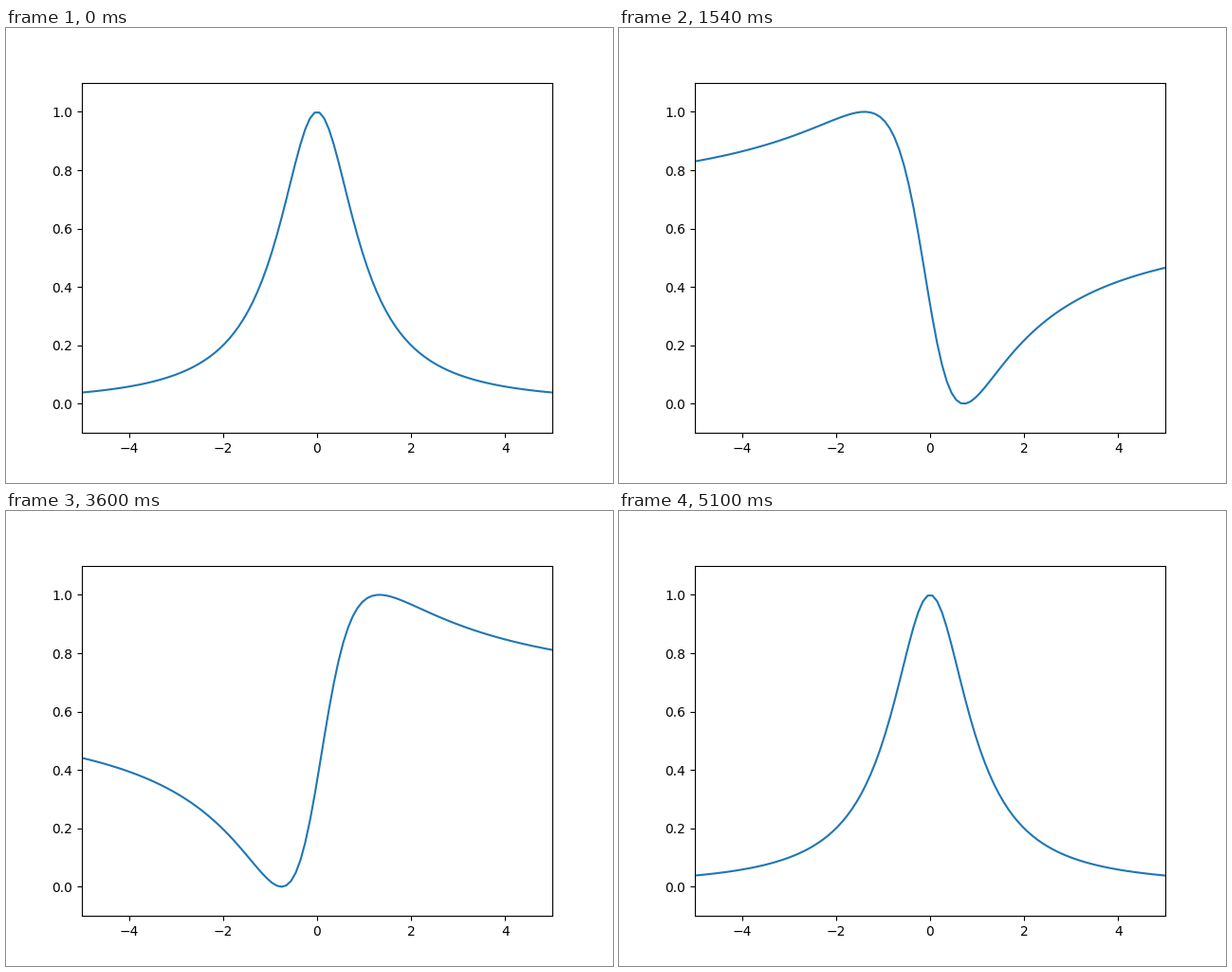
Recreate the animation shown at these times as a matplotlib script. Size 640 by 480 pixels, loop 5.12 s.

```python
import numpy as np
import matplotlib.pyplot as plt
from matplotlib.animation import FuncAnimation

FRAMES = 256
INTERVAL = 20  # ms

x = np.linspace(-5, 5, 100)
phases = np.linspace(0, np.pi, FRAMES)


def profile(phase):
    """Fano-type resonance: a Lorentzian peak at phase 0, a dip at pi/2."""
    return np.cos(np.arctan(x) + phase) ** 2


fig, ax = plt.subplots(figsize=(6.4, 4.8), dpi=100)
ax.set_xlim(-5, 5)
ax.set_ylim(-0.1, 1.1)
line, = ax.plot(x, profile(0), color="C0", lw=1.5)


def update(i):
    line.set_ydata(profile(phases[i]))
    return line,


anim = FuncAnimation(fig, update, frames=FRAMES, interval=INTERVAL,
                     repeat=True, repeat_delay=0, blit=False)

plt.show()
```
